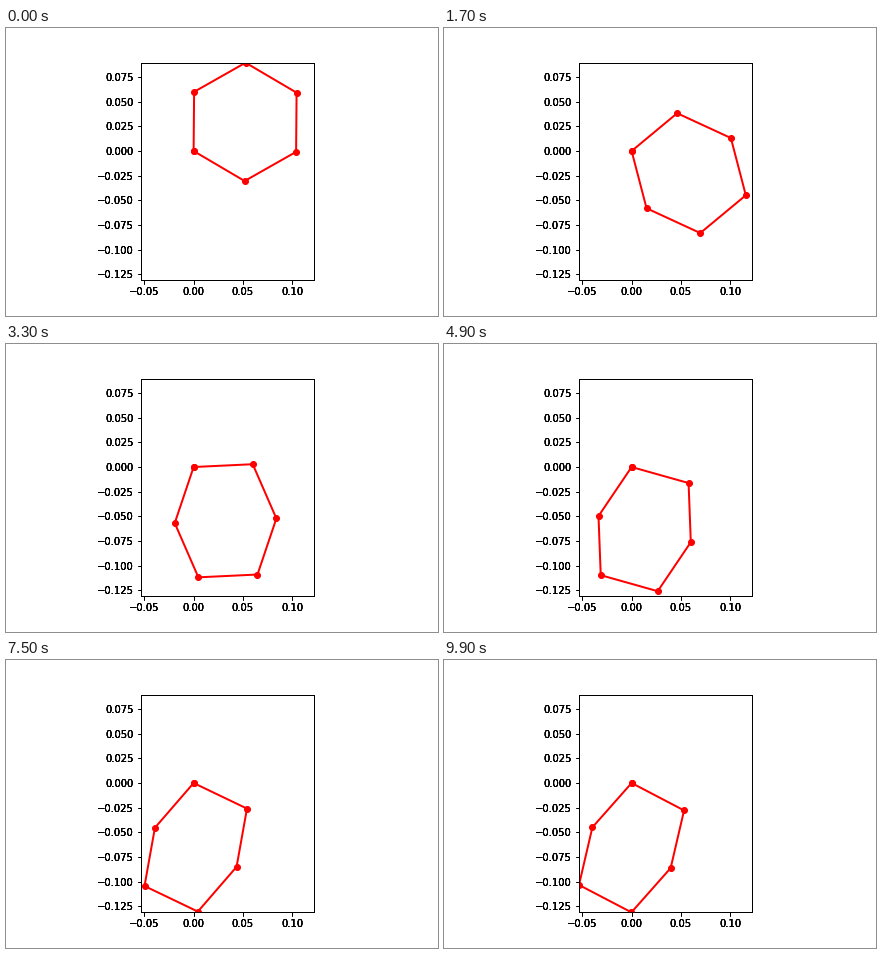
A matplotlib script that plays this animation: 432 px wide and 288 px high, repeating every 10000 ms.

```python
import numpy as np
import matplotlib.pyplot as plt
from matplotlib.animation import FuncAnimation

plt.rcParams.update({"font.family": "DejaVu Sans", "font.size": 10})

SIDE = 0.06
FRAMES = 100
INTERVAL = 100
LAYERS = 4  # stacked axes harden the antialiased ticks and labels


def link_angles(i):
    """Directions of the three pairs of parallel sides, in radians."""
    # damped swing of the long diagonal towards straight down
    swing = 2 * np.degrees(np.arctan(np.exp(0.552 - 0.0528 * i - 0.000075 * i**2)))
    theta = np.radians(swing - 0.6 - 90)
    # slow sag of the joints
    upper = np.radians(62.5 - 2.5 * np.exp(-((i / 26) ** 2)))
    lower = np.radians(40.5 + 19.5 * np.exp(-((i / 39.9) ** 1.22)))
    middle = np.arcsin(np.sin(upper) - np.sin(lower))
    return theta + np.array([upper, -middle, -lower])


def hexagon(i):
    angles = link_angles(i)
    sides = SIDE * np.column_stack([np.cos(angles), np.sin(angles)])
    steps = np.vstack([[0, 0], sides, -sides])
    return np.cumsum(steps, axis=0).T


def make_axes():
    ax = fig.add_axes([0.125, 0.125, 0.775, 0.755], facecolor="none")
    ax.set_aspect("equal")
    ax.set_xlim(-0.0536, 0.1221)
    ax.set_ylim(-0.1308, 0.0897)
    ax.set_xticks(np.arange(-1, 3) * 0.05)
    ax.set_yticks(np.arange(-5, 4) * 0.025)
    ax.xaxis.set_major_formatter("{x:.2f}")
    ax.yaxis.set_major_formatter("{x:.3f}")
    return ax


fig = plt.figure(figsize=(6, 4), dpi=72, facecolor="white")
ax = [make_axes() for _ in range(LAYERS)][-1]
line, = ax.plot(*hexagon(0), "o-", color="red", lw=2, ms=6)


def update(i):
    line.set_data(*hexagon(i))
    return line,


anim = FuncAnimation(fig, update, frames=FRAMES, interval=INTERVAL,
                     repeat=True, repeat_delay=0)
plt.show()
```
